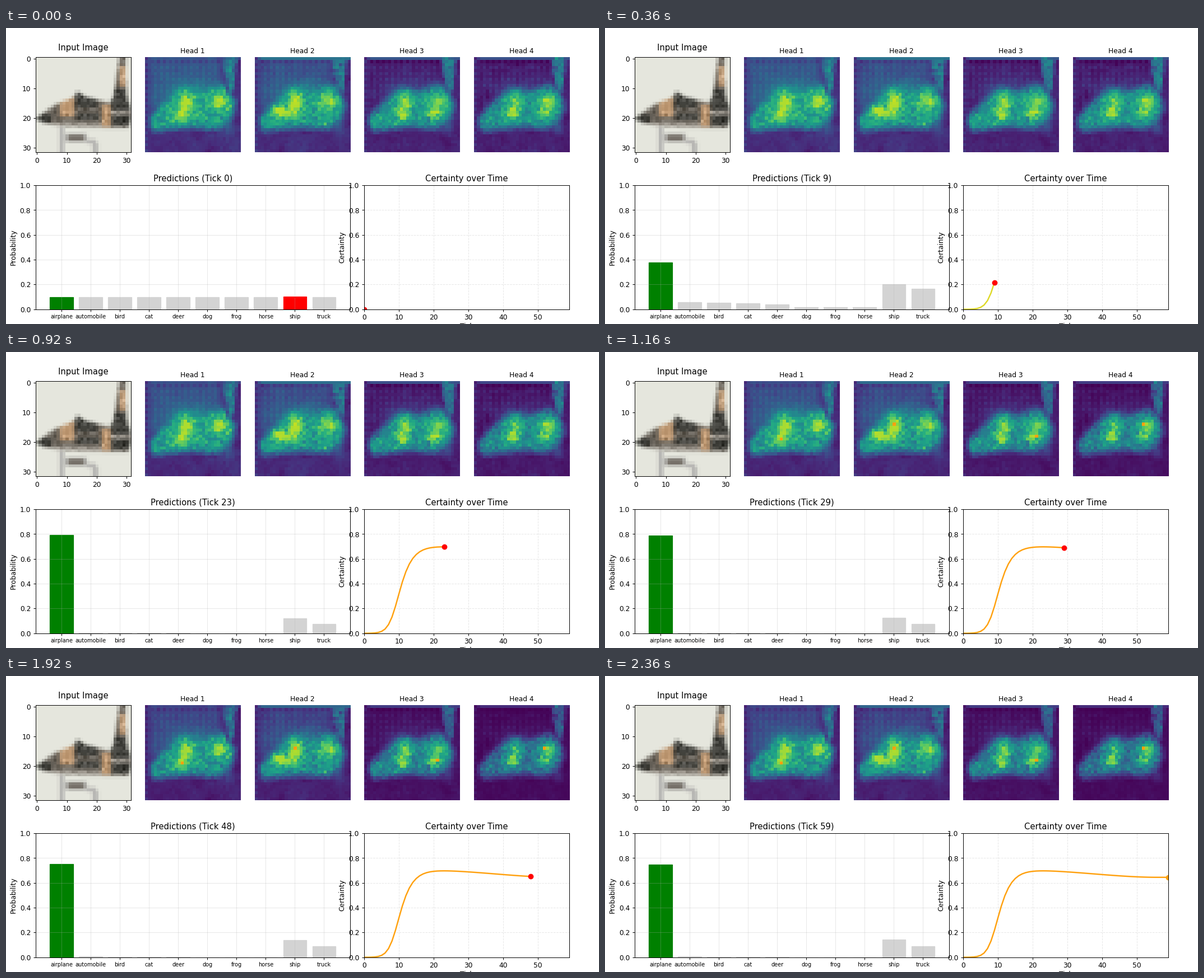
Animation of 1058 by 529 pixels, one loop 2400 ms. Source, as a matplotlib script:

```python
import numpy as np
import matplotlib.pyplot as plt
from matplotlib.animation import FuncAnimation
from matplotlib.path import Path

W, H, TICKS, N, SS = 1058, 529, 60, 32, 4
LABELS = ["airplane", "automobile", "bird", "cat", "deer",
          "dog", "frog", "horse", "ship", "truck"]
TRUE, SHIP = 0, 8
ORANGE = (1.0, 0.63, 0.06)
YELLOW = (0.87, 0.85, 0.16)
Y, X = np.mgrid[0:N, 0:N].astype(float)

plt.rcParams["font.family"] = "DejaVu Sans"
fig = plt.figure(figsize=(12, 6), dpi=88.16667, facecolor="white")


def smoothstep(u):
    u = np.clip(u, 0, 1)
    return u * u * (3 - 2 * u)


def logistic(u):
    return 1 / (1 + np.exp(-u))


def bump(x, y, sx, sy):
    return np.exp(-((X - x) / sx) ** 2 - ((Y - y) / sy) ** 2)


# ---------- coarse raster shapes ----------
def inside(points):
    """Fine-grid mask of a polygon given in cell coordinates."""
    s = (np.arange(N * SS) + 0.5) / SS - 0.5
    gx, gy = np.meshgrid(s, s)
    pts = np.column_stack([gx.ravel(), gy.ravel()])
    return Path(points).contains_points(pts).reshape(gx.shape)


def rect(x0, y0, x1, y1):
    return inside([(x0, y0), (x1, y0), (x1, y1), (x0, y1)])


def shrink(a):
    return a.astype(float).reshape(N, SS, N, SS, -1).mean(axis=(1, 3)).squeeze()


def blur(a, r=1):
    n = len(a)
    pad = [(r, r), (r, r)] + [(0, 0)] * (a.ndim - 2)
    p = np.pad(a.astype(float), pad, mode="edge")
    k = range(2 * r + 1)
    return sum(p[i:i + n, j:j + n] for i in k for j in k) / len(k) ** 2


def picture():
    paper, dark, mid = (229, 230, 221), (66, 66, 61), (108, 102, 93)
    pale, tan, strut = (158, 152, 143), (190, 152, 114), (176, 175, 173)
    body = inside([(-.5, 20.2), (6, 15.5), (12.4, 13), (13.5, 11), (16, 12.8),
                   (24, 15), (25.5, 13), (27.4, -.5), (29.5, -.5), (29.7, 12),
                   (31.5, 18), (30.5, 23.2), (16, 23.2), (8, 22.8), (2, 21.6)])
    img = np.full((N * SS, N * SS, 3), paper, float)
    for mask, color in [(rect(7.6, 23, 8.9, 31.5), strut),
                        (rect(9.6, 25.2, 16.6, 28), strut),
                        (rect(10.3, 25.8, 15.8, 27.4), mid),
                        (rect(16.5, 27.3, 19.4, 28.5), strut),
                        (rect(18.6, 28.2, 20.3, 31.5), strut)]:
        img[mask] = color
    for mask, color in [(body, mid),
                        (rect(-1, 18.5, 4.6, 21.6), dark),
                        (rect(7.5, 13, 12.4, 19.5), tan),
                        (rect(12.5, 10, 20, 16.5), dark),
                        (rect(13, 18.5, 21, 20.6), dark),
                        (rect(5, 21.6, 22, 24), pale),
                        (rect(21.5, 15.5, 24.5, 23), tan),
                        (rect(24.5, 10, 32, 17.5), dark),
                        (rect(24.5, 17.5, 32, 19), pale),
                        (rect(24.5, 19, 32, 22.4), dark),
                        (rect(27.4, 2.6, 29.6, 9.5), tan)]:
        img[mask & body] = color
    small = shrink(blur(img, 2))
    grain = np.random.default_rng(4).normal(0, 11, (N, N)) * shrink(body)
    return np.clip(small + grain[..., None], 0, 255).astype(np.uint8)


# ---------- attention maps ----------
hull = blur(shrink(inside([(0, 21), (6, 14.8), (11.5, 10), (18, 11.3), (23.5, 8.8),
                           (26, 9), (29.6, 15), (28.5, 20), (24, 23.7),
                           (15, 23), (2, 24.4)])))
tail = shrink(inside([(25.8, -.5), (30, -.5), (29.3, 11), (27.6, 11), (25.8, 4)]))
SPOTS = [bump(13.3, 14.3, 2.4, 3.4), bump(12, 18.6, 2.4, 2.2),
         bump(24.3, 14.4, 2.8, 2.4), bump(22.8, 18.3, 2.6, 1.8),
         bump(7.8, 18, 2.6, 2.1)]


def attention(seed, sky, body, glow, rim, weights):
    rng = np.random.default_rng(seed)
    ground = 0.08 + 0.2 * sky
    air = logistic((18 - Y) / 1.5) * logistic((25 - X) / 0.6)
    v = ground + (sky - ground) * air
    v += glow * bump(15, 11.5, 9, 4.5)
    v += 0.04 * (X % 2) * (0.4 + Y % 2) * air
    v += 0.16 * bump(27.5, 23, 1.8, 2.5)
    v += 0.04 * blur(rng.normal(0, 1, (N, N)))
    v += (body - v) * hull
    v += (0.45 - v) * tail * 0.85
    v += sum(w * s for w, s in zip(weights, SPOTS))
    v += rng.normal(0, 1, (N, N)) * (0.01 + 0.05 * hull + 0.05 * tail)
    v[0, 1:] = np.maximum(v[0, 1:], rim)
    v[1, :25] -= 0.06
    v[:, 0] = ground + 0.07 * (Y[:, 0] % 2)
    v[:, 1] -= 0.4 * (v[:, 1] - ground)
    v = np.where(v > 0.88, 0.88 + 0.2 * (v - 0.88), v)
    return np.clip(v, 0.01, 0.97)


HEADS = [attention(1, .26, .57, .17, .22, (.32, .32, .40, 0, .06)),
         attention(2, .23, .56, .19, .38, (.40, .20, .34, .06, .38)),
         attention(3, .07, .53, .15, .27, (.26, .34, .30, .35, 0)),
         attention(4, .06, .50, .13, .25, (.24, .34, .38, .28, 0))]
SHARPEN = [0.20, 0.16, 0.32, 0.50]


def head_rgb(k, tick):
    v = HEADS[k]
    power = 1 + SHARPEN[k] * smoothstep((tick - 12) / 36)
    rgb = plt.cm.viridis(v ** power)[..., :3]
    if tick > 25:
        rgb[v == v.max()] = ORANGE
    return rgb


# ---------- predictions: softmax of logits pulled apart over time ----------
DEPTH = np.array([0, 5.3, 5.5, 5.8, 6.5, 8.5, 8.5, 8.5, 1.88, 2.34])


def probabilities(tick):
    rise = logistic(0.4 * (tick - 10.5)) - logistic(-4.2)
    logits = -DEPTH * (1.045 * rise - 0.13 * smoothstep((tick - 16) / 40))
    logits[SHIP] += 0.03
    e = np.exp(logits)
    return e / e.sum()


ticks = np.arange(TICKS)
probs = np.array([probabilities(t) for t in ticks])
certainty = 1 + (probs * np.log(probs)).sum(axis=1) / np.log(len(LABELS))


# ---------- layout ----------
LEFT, STEP, SIDE = 52.7, 195.45, 170.1


def axes(x0, y0, x1, y1):
    return fig.add_axes([x0 / W, 1 - y1 / H, (x1 - x0) / W, (y1 - y0) / H])


def image_axes(col, img):
    x = LEFT + STEP * col
    ax = axes(x, 52.2, x + SIDE, 222)
    return ax, ax.imshow(img, interpolation="nearest", aspect="auto")


def chart_axes(first, last, name, ylabel, style):
    ax = axes(LEFT + STEP * first, 281.2, LEFT + STEP * last + SIDE, 502.7)
    ax.set_ylim(0, 1)
    ax.set_ylabel(ylabel)
    ax.grid(True, linestyle=style, alpha=0.3)
    return ax, ax.set_title(name)


ax, _ = image_axes(0, picture())
ax.set_xticks(range(0, 31, 10))
ax.set_yticks(range(0, 31, 10))
ax.set_title("Input Image", pad=10)

maps = []
for k in range(4):
    ax, im = image_axes(k + 1, head_rgb(k, 0))
    ax.set_title(f"Head {k + 1}", fontsize=10)
    ax.axis("off")
    maps.append(im)

pred, title = chart_axes(0, 2, "", "Probability", "-")
bars = pred.bar(range(10), probs[0], color="lightgray")
pred.set_xticks(range(10), LABELS, fontsize=8)
pred.set_xlim(-0.89, 9.89)

cert, _ = chart_axes(3, 4, "Certainty over Time", "Certainty", "--")
cert.set_xlim(0, TICKS - 1)
cert.set_xlabel("Tick", labelpad=2.5)
line, = cert.plot([], [], linewidth=2)
dot, = cert.plot([], [], "o", markersize=8, markeredgewidth=0)


def update(tick):
    for k, im in enumerate(maps):
        im.set_data(head_rgb(k, tick))
    p = probs[tick]
    for k, bar in enumerate(bars):
        bar.set_height(p[k])
        bar.set_color("green" if k == TRUE else
                      "red" if k == p.argmax() else "lightgray")
    title.set_text(f"Predictions (Tick {tick})")
    warm = smoothstep((tick - 9) / 10)
    line.set_data(ticks[:tick + 1], certainty[:tick + 1])
    line.set_color([a + (b - a) * warm for a, b in zip(YELLOW, ORANGE)])
    dot.set_data([tick], [certainty[tick]])
    dot.set_color(ORANGE if tick == TICKS - 1 else "red")
    return [*maps, *bars, title, line, dot]


anim = FuncAnimation(fig, update, frames=TICKS, interval=40,
                     repeat=True, repeat_delay=0, blit=False)
plt.show()
```
